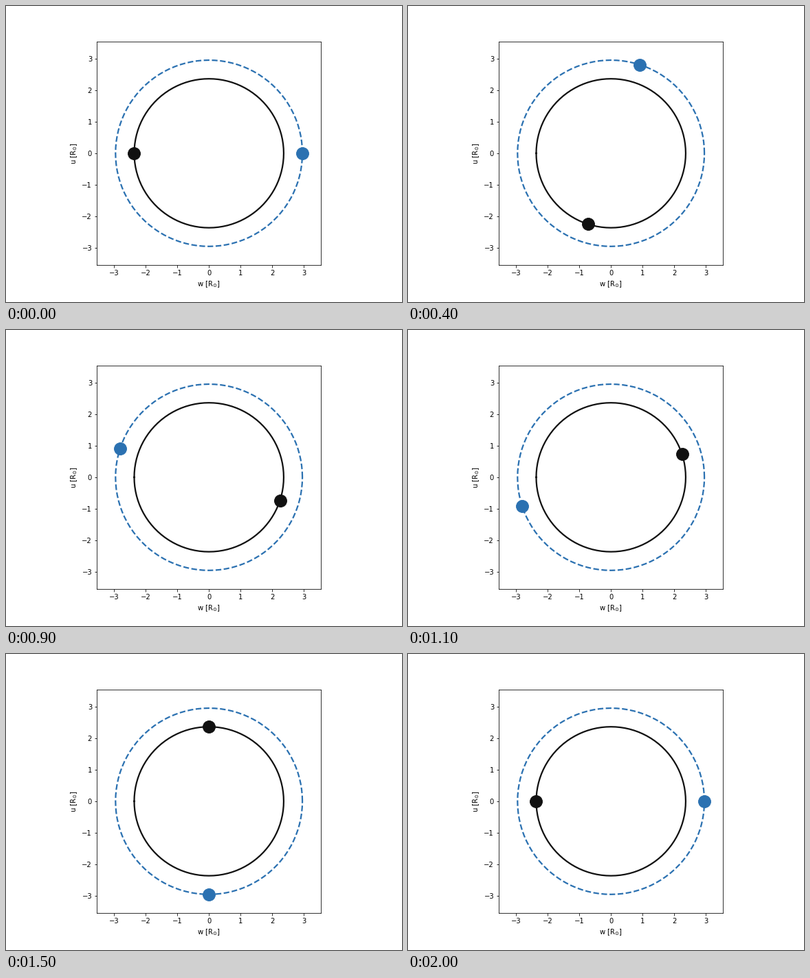
A matplotlib script for the animation above (2100 ms loop, 576 by 432 pixels).

```python
import numpy as np
import matplotlib.pyplot as plt
from matplotlib.animation import FuncAnimation

BLUE, BLACK = "#2b71b1", "#111111"
STEPS = 20
LIMIT = 3.54

plt.rcParams["font.family"] = "DejaVu Sans"
plt.rcParams["font.size"] = 10

fig, ax = plt.subplots(figsize=(8, 6), dpi=72)
fig.subplots_adjust(left=0.125, right=0.9, bottom=0.125, top=0.88)
ax.set_aspect("equal")
ax.set_xlim(-LIMIT, LIMIT)
ax.set_ylim(-LIMIT, LIMIT)
ax.set_xticks(range(-3, 4))
ax.set_yticks(range(-3, 4))
ax.set_xlabel(r"w [$\mathrm{R_{\odot}}$]")
ax.set_ylabel(r"u [$\mathrm{R_{\odot}}$]")


def position(radius, start, phase):
    angle = start + 2 * np.pi * phase
    return radius * np.cos(angle), radius * np.sin(angle)


def add_body(radius, start, color, style):
    """Draw an orbit and return the moving body's marker with its path."""
    ax.plot(*position(radius, start, np.linspace(0, 1, 101)),
            color=color, ls=style, lw=2.23)
    marker, = ax.plot([], [], "o", color=color, ms=17.86, zorder=3)
    return marker, radius, start


bodies = [
    add_body(2.36, np.pi, BLACK, "-"),
    add_body(2.95, 0, BLUE, "--"),
]


def update(frame):
    for marker, radius, start in bodies:
        x, y = position(radius, start, frame / STEPS)
        marker.set_data([x], [y])
    return [body[0] for body in bodies]


anim = FuncAnimation(fig, update, frames=STEPS + 1, interval=100,
                     repeat=True, repeat_delay=0)
plt.show()
```
